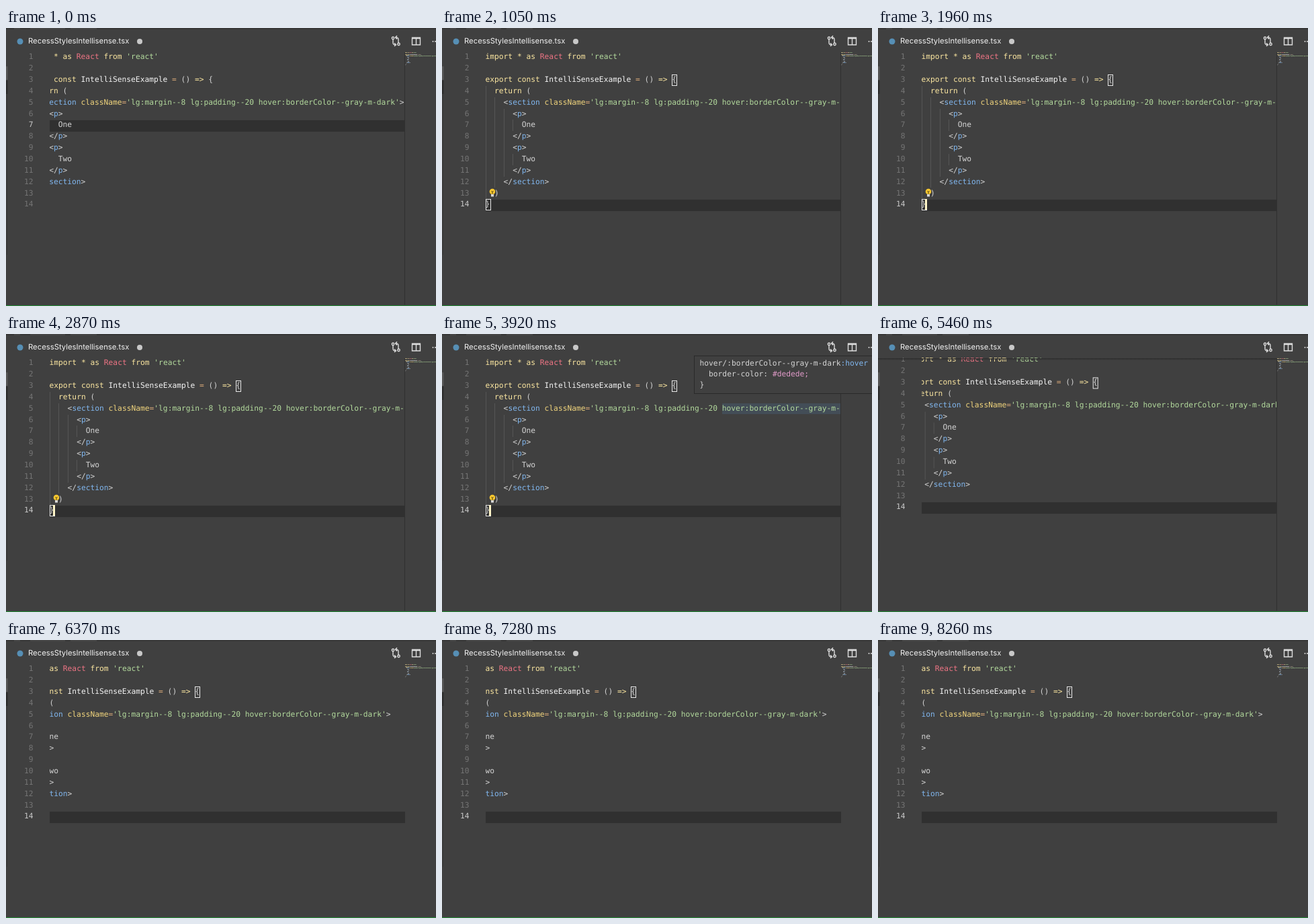
An HTML page for the animation above (8330 ms loop, 640x413 px).

```html
<!DOCTYPE html>
<html lang="en">
<head>
<meta charset="utf-8">
<title>Editor hover demo</title>
<style>
html, body { margin: 0; width: 100%; height: 100%; overflow: hidden; background: #404040 }
#stage { position: relative; width: 640px; height: 413px; overflow: hidden; background: #404040;
  font: 11.25px/16.84px "DejaVu Sans Mono", monospace; color: #d4d4d4;
  text-rendering: geometricPrecision; white-space: pre }
#stage div, #stage svg { position: absolute }
#stage svg { left: 0; top: 0 }
.tab { left: 33px; top: 11px; font: 11.3px/17px Inter, sans-serif; color: #f2f2f2 }
#view { left: 0; top: 35px; width: 594px; height: 377px; overflow: hidden }
#nums { left: 0; top: .4px; width: 40.5px; text-align: right; color: #747474 }
#nums .on { color: #c8c8c8 }
#clip { left: 64.5px; top: 0; width: 529px; height: 377px; overflow: hidden }
#pane { left: 0; top: .4px; width: 900px; height: 260px }
#row { left: 65px; width: 529px; height: 17px; background: #303030 }
#shade { left: 0; top: 1px; width: 594px; height: 3px; background: linear-gradient(#2c2c2c, #2c2c2c00) }
.guide { width: 1px; background: #555 }
.match { width: 6px; height: 15px; border: 1px solid #e8e8e8; box-sizing: content-box }
#caret { width: 3px; height: 16px; background: #fff6c8 }
#word { height: 16px; background: #434d57 }
#map { left: 594px; top: 36px; transform: scale(.083); transform-origin: 0 0; font-weight: bold;
  -webkit-text-stroke: 1.5px }
#tip { left: 375px; top: 32px; width: 270px; height: 55px; background: #404040;
  border: 1px solid #2a2a2a; line-height: 15.9px }
#tip span { position: absolute; left: 7.5px; top: 3px }
.kw { color: #fbe6a0 } .red { color: #ee7484 } .str { color: #b2d99c }
.tag { color: #80b6ee } .attr { color: #f0d47c } .op { color: #d9a878 } .val { color: #e09ac8 }
.name { color: #f4f4f4 }
</style>
</head>
<body>
<div id="stage">
  <div id="view">
    <div id="row"></div>
    <div id="nums"></div>
    <div id="clip"><div id="pane"></div></div>
    <div id="shade"></div>
  </div>
  <div id="map"></div>
  <svg width="640" height="413" fill="none">
    <path d="M0 1H640" stroke="#383838" stroke-width="2"/>
    <path d="M12 1H21M36 1H88M96 1H135" stroke="#555"/>
    <path id="edge" d="M593.500 36V411" stroke="#303030"/>
    <path d="M1.500 57V337" stroke="#363636"/>
    <path d="M1 57V77" stroke="#585858" stroke-width="3"/>
    <path d="M1 78V98" stroke="#2d2d2d" stroke-width="3"/>
    <path d="M0 412.500H640" stroke="#238a35"/>
    <circle cx="21" cy="20" r="4.500" fill="#568fb5"/>
    <circle cx="199" cy="20" r="4" fill="#c8c8c8"/>
    <g stroke="#dcdcdc" stroke-width="1.400">
      <path d="M576 17V22Q576 25 580 25M578 22.500L580.500 25L578 27M584 22V17Q584 14 580 14M582 11.500L579.500 14L582 16.500"/>
      <circle cx="576" cy="15" r="1.700"/><circle cx="584.500" cy="24" r="1.700"/>
      <path d="M604.500 14.500H616.500V25H604.500ZM610.500 14V25"/>
      <path d="M604 15H617" stroke-width="2.500"/>
    </g>
    <g fill="#dcdcdc"><circle cx="635.500" cy="20" r="1"/><circle cx="639" cy="20" r="1"/></g>
    <g id="bulb">
      <path d="M70 238H80V252H70Z" fill="#404040"/>
      <circle cx="75" cy="243" r="4.300" fill="#f6c62f"/>
      <path d="M73 247H77V250.500H73Z" fill="#d8d8d8"/>
      <path d="M73.500 242L75 244L76.500 242M75 244V247" stroke="#5a4a18"/>
    </g>
  </svg>
  <div class="tab">RecessStylesIntellisense.tsx</div>
  <div id="tip"><span>hover/:borderColor--gray-m-dark<i class="tag" style="font-style:normal">:hover</i>
  border-color: <b class="val" style="font-weight:400">#dedede;</b>
}</span></div>
</div>
<script>
const LOOP = 8330, CLICK = 490, BULB = 800, TIP_IN = 3850, TIP_OUT = 5300;
const SCROLL = 5330, SCROLL_TIME = 550;
const CHAR = 6.773, LINE = 16.84;
const $ = id => document.getElementById(id);

const source = `import * as React from 'react'

export const IntelliSenseExample = () => {
  return (
    <section className='lg:margin--8 lg:padding--20 hover:borderColor--gray-m-dark'>
      <p>
        One
      </p>
      <p>
        Two
      </p>
    </section>
  )
}`;

const rules = [
  ['str', "'[^']*'"], ['kw', '\\b(?:import|as|from|export|const|return)\\b|\\*|=>'],
  ['tag', '(?<=&lt;/?)(?:section|p)\\b'], ['attr', 'className'],
  ['red', 'React'], ['name', 'IntelliSenseExample'], ['op', '=']
];
const pattern = new RegExp(rules.map(([c, r]) => `(?<${c}>${r})`).join('|'), 'g');
const code = source.replace(/</g, '&lt;').replace(pattern, (...args) => {
  const groups = args.at(-1);
  const kind = Object.keys(groups).find(k => groups[k]);
  return `<span class="${kind}">${args[0]}</span>`;
});

const box = (attrs, col, line, style = '') =>
  `<div ${attrs} style="left:${col * CHAR}px;top:${(line - 1) * LINE}px;${style}"></div>`;
const guide = (col, first, last) =>
  box('class="guide"', col, first, `height:${(last - first + 1) * LINE}px`);

$('pane').innerHTML =
  guide(0, 4, 13) + guide(2, 5, 12) + guide(4, 6, 11) + guide(6, 7, 7) + guide(6, 10, 10) +
  box('id="word"', 52, 5, `width:${30 * CHAR}px`) +
  `<div>${code}</div>` +
  box('class="match"', 41, 3) + box('class="match"', 0, 14) +
  box('id="caret"', .85, 14);
$('map').innerHTML = code;
$('nums').innerHTML = source.split('\n').map((_, i) => `<span>${i + 1}</span>`).join('\n');

const nums = [...$('nums').children];
const matches = [...document.querySelectorAll('.match')];
const show = (el, on) => el.style.visibility = on ? 'visible' : 'hidden';

function draw() {
  const t = performance.now() % LOOP;
  const clicked = t >= CLICK;
  const u = Math.min(1, Math.max(0, (t - SCROLL) / SCROLL_TIME));
  const x = clicked ? 61 * Math.sin(u * Math.PI / 2) : 41;
  const y = 6.7 * Math.sin(u * Math.PI);
  const active = clicked ? 14 : 7;
  const hover = t >= TIP_IN && t < TIP_OUT;

  $('pane').style.transform = `translate(${-x}px,${-y}px)`;
  $('nums').style.transform = `translateY(${-y}px)`;
  $('row').style.top = (active - 1) * LINE + .6 - y + 'px';
  nums.forEach((n, i) => n.className = i + 1 === active ? 'on' : '');
  matches.forEach(m => show(m, clicked));
  show($('caret'), clicked && (t - CLICK) % 1000 < 500);
  show($('bulb'), t >= BULB && t < SCROLL);
  show($('tip'), hover);
  show($('word'), hover);
  // Edge shadows appear only while content continues past that side.
  show($('edge'), u < 1);
  show($('shade'), y > .5);
  requestAnimationFrame(draw);
}
draw();
</script>
</body>
</html>
```
